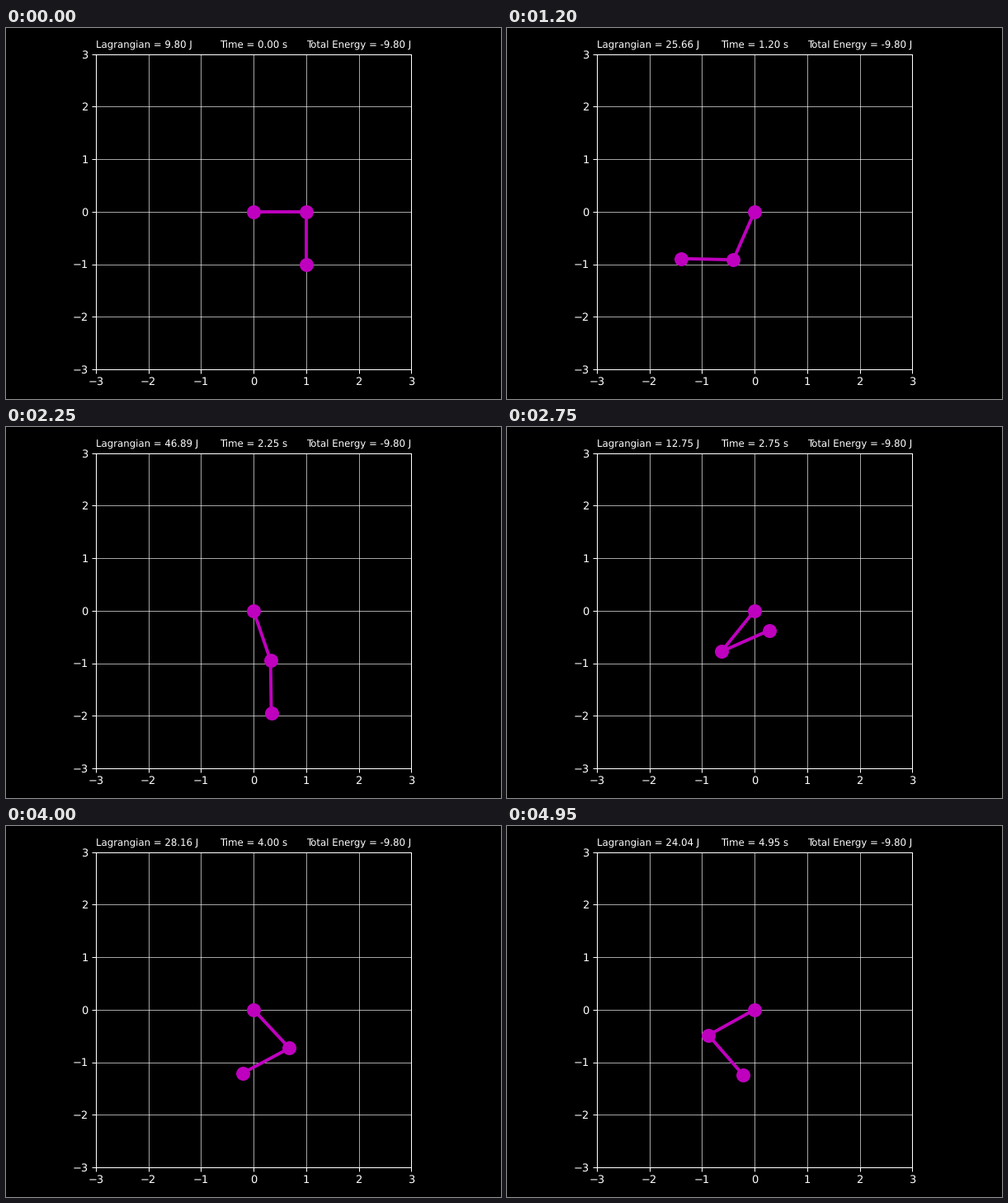
These frames come from a looping animation (600x450 px, 5000 ms). A matplotlib script:

```python
from math import cos, pi, sin

import matplotlib.pyplot as plt
import numpy as np
from matplotlib.animation import FuncAnimation

G = 9.8            # gravity, with unit masses and unit rods
FRAMES = 100
INTERVAL = 50      # ms
SUBSTEPS = 50      # integration steps per frame


def derivs(state):
    """Equations of motion of the double pendulum."""
    a, b, va, vb = state
    d = a - b
    s, c = sin(d), cos(d)
    den = 2 - c * c
    acc_a = (-2 * G * sin(a) + G * sin(b) * c - s * (vb * vb + va * va * c)) / den
    acc_b = (2 * (G * sin(a) * c - G * sin(b)) + s * (2 * va * va + vb * vb * c)) / den
    return np.array([va, vb, acc_a, acc_b])


def rk4(state, h):
    k1 = derivs(state)
    k2 = derivs(state + h / 2 * k1)
    k3 = derivs(state + h / 2 * k2)
    k4 = derivs(state + h * k3)
    return state + h / 6 * (k1 + 2 * k2 + 2 * k3 + k4)


def simulate():
    state = np.array([pi / 2, 0.0, 0.0, 0.0])
    h = INTERVAL / 1000 / SUBSTEPS
    states = [state]
    for _ in range(FRAMES - 1):
        for _ in range(SUBSTEPS):
            state = rk4(state, h)
        states.append(state)
    return states


def energies(state):
    a, b, va, vb = state
    kinetic = va * va + vb * vb / 2 + va * vb * cos(a - b)
    potential = -G * (2 * cos(a) + cos(b))
    return kinetic, potential


states = simulate()

plt.style.use("dark_background")
plt.rcParams.update({"font.family": "DejaVu Sans", "text.hinting": "none"})
fig, ax = plt.subplots(figsize=(6.4, 4.8), dpi=93.75)
fig.subplots_adjust(left=0.1, right=0.9, top=0.93, bottom=0.08)
ax.set(xlim=(-3, 3), ylim=(-3, 3), aspect="equal")
ax.set_xticks(range(-3, 4))
ax.set_yticks(range(-3, 4))
ax.grid(color="white", lw=0.5)

rods, = ax.plot([], [], "mo-", lw=3, markersize=12)
left, mid, right = (ax.set_title("", loc=loc, fontsize=9)
                    for loc in ("left", "center", "right"))


def update(i):
    a, b = states[i][:2]
    x, y = sin(a), -cos(a)
    rods.set_data([0, x, x + sin(b)], [0, y, y - cos(b)])
    kinetic, potential = energies(states[i])
    left.set_text(f"Lagrangian = {kinetic - potential:.2f} J")
    mid.set_text(f"Time = {i * INTERVAL / 1000:.2f} s")
    right.set_text(f"Total Energy = {kinetic + potential:.2f} J")
    return rods, left, mid, right


anim = FuncAnimation(fig, update, frames=FRAMES, interval=INTERVAL,
                     repeat=True, repeat_delay=0)
plt.show()
```
